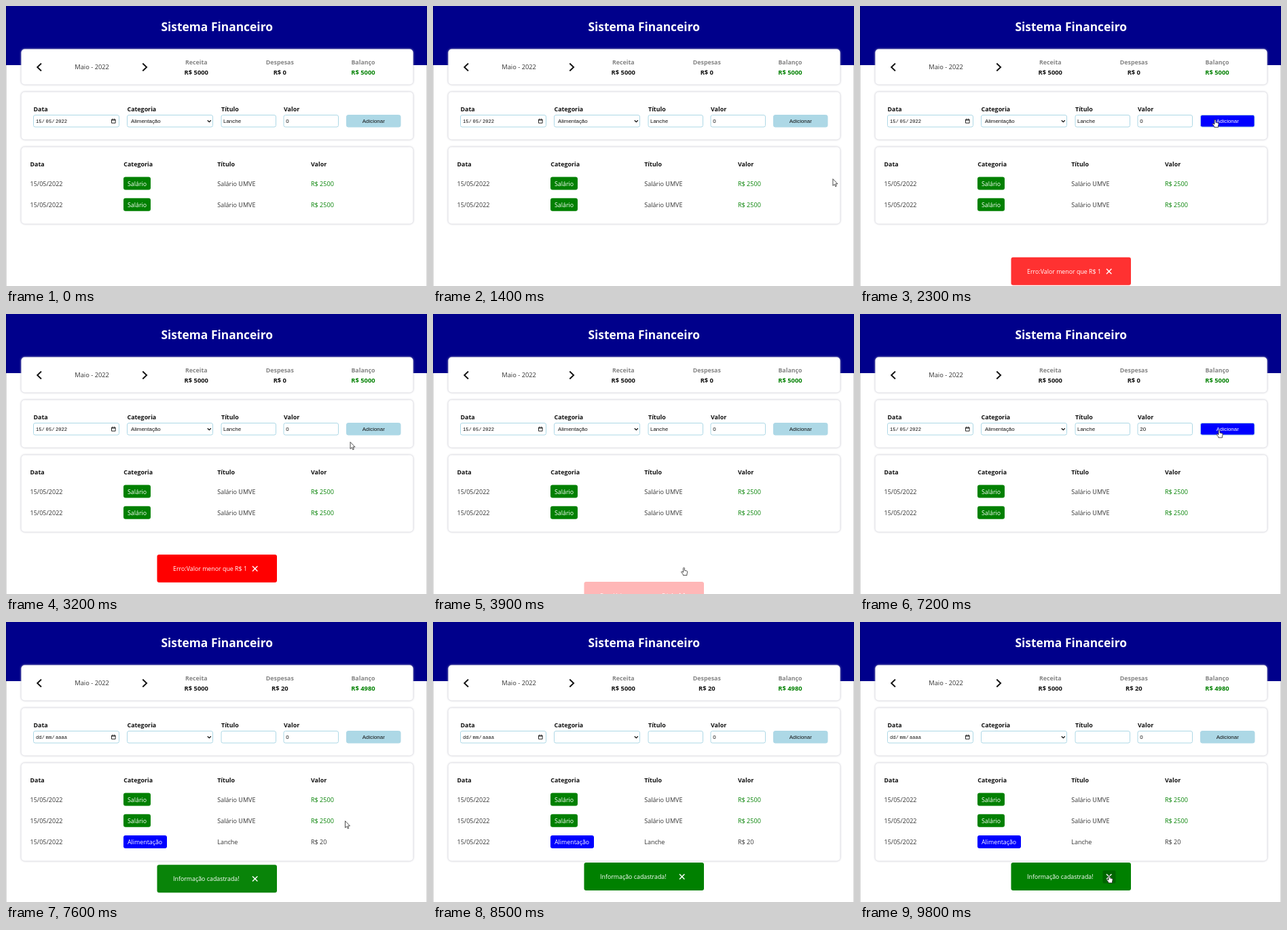
Animation of 620 by 412 pixels, one loop 9.9 s. Source, as an HTML page:

```html
<!DOCTYPE html>
<html lang="pt-BR">
<head>
<meta charset="utf-8">
<title>Sistema Financeiro</title>
<style>
  html, body { margin: 0; width: 100%; height: 100%; overflow: hidden; background: #fff; }
  svg { display: block; width: 620px; height: 412px; }
  text { font: 9.05px "Open Sans", "Noto Sans", sans-serif; fill: #333; white-space: pre; }
  .title { font-size: 17.4px; font-weight: 700; fill: #fff; }
  .label { font-size: 8.9px; font-weight: 700; fill: #111; }
  .head { font-size: 8.85px; font-weight: 700; fill: #858585; }
  .sum { font-size: 9.4px; font-weight: 700; fill: #111; }
  .mid { text-anchor: middle; }
  .green { fill: green; }
  .white { fill: #fff; }
  .tag, .note { font-size: 8.85px; fill: #fff; }
  .ctl { font: 7.95px "Liberation Sans", Arial, sans-serif; fill: #111; }
  .mono { font: 7.15px "Liberation Mono", "DejaVu Sans Mono", monospace; fill: #111; }
  .card { fill: #fff; filter: drop-shadow(0 0 1.4px #b4b4c0); }
  .field { fill: #fff; stroke: #add8e6; }
  .line { fill: none; stroke: #111; }
  .cursor { fill: #fff; stroke: #222; stroke-width: .8; stroke-linejoin: round; }
</style>
</head>
<body>
<svg viewBox="0 0 620 412">
  <rect width="620" height="412" fill="#fff"/>
  <rect width="620" height="87" fill="#00008b"/>
  <path d="M.5 0V412M619.5 0V412" stroke="#000" stroke-opacity=".15"/>
  <text class="title mid" x="310.7" y="37">Sistema Financeiro</text>

  <rect class="card" x="22.5" y="63.5" width="577" height="52" rx="5"/>
  <path class="line" stroke-width="1.9" d="M52 84.5 46.2 90 52 95.5M201.3 84.5 207.1 90 201.3 95.5"/>
  <text class="mid" x="126.6" y="93.3" style="font-size:9.3px">Maio - 2022</text>
  <g class="mid">
    <text class="head" x="280.3" y="86">Receita</text>
    <text class="head" x="403.3" y="86">Despesas</text>
    <text class="head" x="526" y="86">Balanço</text>
    <text class="sum" x="280.3" y="101.3">R$ 5000</text>
    <text class="sum" id="spent" x="403.3" y="101.3">R$ 0</text>
    <text class="sum green" id="balance" x="526" y="101.3">R$ 5000</text>
  </g>

  <rect class="card" x="22.5" y="126.5" width="577" height="70" rx="5"/>
  <text class="label" x="40.5" y="155">Data</text>
  <text class="label" x="178.5" y="155">Categoria</text>
  <text class="label" x="317" y="155">Título</text>
  <text class="label" x="409" y="155">Valor</text>
  <rect class="field" x="40.5" y="160.5" width="126" height="17.5" rx="2.5"/>
  <rect class="field" x="178.5" y="160.5" width="126" height="17.5" rx="2.5"/>
  <rect class="field" x="317" y="160.5" width="80.5" height="17.5" rx="2.5"/>
  <rect class="field" id="amountBox" x="409" y="160.5" width="80.5" height="17.5" rx="2.5"/>
  <text class="mono" y="171.8"><tspan id="day" x="44"></tspan><tspan id="month" x="58.6"></tspan><tspan id="year" x="73"></tspan></text>
  <path class="line" stroke-width=".9" d="M155.5 167h5.6v5.2h-5.6zM155.5 168h5.6M156.8 165.8v1.2M159.8 165.8v1.2"/>
  <text class="ctl" id="category" x="184" y="172"></text>
  <path class="line" stroke-width="1.3" d="M296.8 168.2l2.5 2.4 2.5-2.4"/>
  <text class="ctl" id="name" x="320" y="172"></text>
  <text class="ctl" id="amount" x="412.3" y="172"></text>
  <path class="line" id="caret" stroke-width=".9" d="M0 164.8v8.6"/>
  <g id="spinner">
    <rect x="476.5" y="163.8" width="9" height="11" fill="#eee"/>
    <path fill="#444" d="M478.6 168l2.4-2.6 2.4 2.6zM478.6 170.6l2.4 2.6 2.4-2.6z"/>
  </g>
  <rect id="button" x="501.5" y="160.5" width="79.5" height="17.5" rx="2.5" stroke="#add8e6"/>
  <text class="ctl mid" id="buttonText" x="541.3" y="172">Adicionar</text>

  <rect class="card" id="list" x="22.5" y="207.5" width="577" height="113" rx="5"/>
  <text class="label" x="35.5" y="236.3">Data</text>
  <text class="label" x="173.3" y="236.3">Categoria</text>
  <text class="label" x="311.2" y="236.3">Título</text>
  <text class="label" x="449" y="236.3">Valor</text>
  <g id="rows"></g>

  <g id="toast">
    <rect id="toastBox" x="222.5" y="354" width="176.5" height="41" rx="3"/>
    <rect id="closeBox" x="357.5" y="365.5" width="19" height="19" rx="2" fill="#000" fill-opacity=".2"/>
    <text class="note" id="note" x="246" y="378"></text>
    <path d="M363 371l7.4 7.4M370.4 371l-7.4 7.4" stroke="#fff" stroke-width="1.4"/>
  </g>

  <g id="cursor">
    <path class="cursor" id="hand" d="M-1 .8Q0-.7 1 .8V4.4L4.2 5Q5.3 5.3 5.2 6.5L4.5 9.6V11.4H-1.2V10.2L-3.6 7.2Q-4.2 6.2-3.2 5.8L-1 7.1Z"/>
    <path class="cursor" id="arrow" d="M0 0V10L2.3 7.9 3.8 11.3 5.3 10.6 3.9 7.3H7Z"/>
  </g>
</svg>
<script>
const LOOP = 9900, STEP = 100;
const SUBMIT = 7300;
const $ = id => document.getElementById(id);
const set = (id, attrs) => { for (const k in attrs) $(id).setAttribute(k, attrs[k]); };
const show = (id, on) => set(id, { visibility: on ? 'visible' : 'hidden' });
const write = (id, s) => { $(id).textContent = s; };
const within = (t, a, b) => t >= a && t < b;
const smooth = p => p * p * (3 - 2 * p);

const row = (y, tag, width, color, name, value, cls) => `<g>
  <text x="35.5" y="${y}">15/05/2022</text>
  <rect x="173" y="${y - 13}" width="${width}" height="19" rx="3" fill="${color}"/>
  <text class="tag" x="179" y="${y}">${tag}</text>
  <text x="311.2" y="${y}">${name}</text>
  <text class="${cls}" x="449" y="${y}">${value}</text></g>`;
const salary = y => row(y, 'Salário', 40, 'green', 'Salário UMVE', 'R$ 2500', 'green');
$('rows').innerHTML = salary(264.5) + salary(295.8) +
  row(327, 'Alimentação', 64, 'blue', 'Lanche', 'R$ 20', '');
$('rows').lastElementChild.id = 'newRow';

// Pointer runs: time, x, y
const runs = [
  [[1300, 612, 285], [1600, 523, 167], [3100, 523, 167], [3600, 369.5, 373], [4000, 369.5, 373], [4500, 430, 168], [4800, 430, 168]],
  [[6600, 440, 170], [7000, 529, 170.5], [7400, 529, 170.5], [7800, 470, 415]],
  [[9100, 420, 415], [9600, 367, 372.5], [LOOP, 367, 372.5]]
];

function pointer(t) {
  const run = runs.find(r => within(t, r[0][0], r[r.length - 1][0]));
  if (!run) return null;
  const i = run.findIndex(p => p[0] > t);
  const [t0, x0, y0] = run[i - 1], [t1, x1, y1] = run[i];
  const p = smooth((t - t0) / (t1 - t0));
  return { x: x0 + (x1 - x0) * p, y: y0 + (y1 - y0) * p };
}

// The CSS "ease" curve
function ease(p) {
  const bez = (a, b, u) => 3 * a * u * (1 - u) ** 2 + 3 * b * u * u * (1 - u) + u ** 3;
  let lo = 0, hi = 1;
  for (let i = 0; i < 20; i++) {
    const u = (lo + hi) / 2;
    if (bez(.25, .25, u) < p) lo = u; else hi = u;
  }
  return bez(.1, 1, lo);
}

function toastAt(t) {
  const enter = start => {
    const p = ease(Math.min(1, (t - start) / 400));
    return { drop: 80 * (1 - p), alpha: p };
  };
  if (t >= SUBMIT) return enter(SUBMIT);
  if (within(t, 2100, 3700)) return enter(2100);
  if (within(t, 3700, 4000)) {
    const p = (t - 3700) / 300;
    return { drop: 60 * p, alpha: Math.max(0, 1 - 1.08 * p) };
  }
  return { drop: 80, alpha: 0 };
}

function draw(t) {
  const done = t >= SUBMIT;
  const pos = pointer(t);
  const over = (x, y, w, h) => !!pos && within(pos.x, x, x + w) && within(pos.y, y, y + h);

  write('spent', done ? 'R$ 20' : 'R$ 0');
  write('balance', done ? 'R$ 4980' : 'R$ 5000');
  write('day', done ? 'dd/' : '15/');
  write('month', done ? 'mm/' : '05/');
  write('year', done ? 'aaaa' : '2022');
  write('category', done ? '' : 'Alimentação');
  write('name', done ? '' : 'Lanche');
  set('list', { height: done ? 144 : 113 });
  show('newRow', done);

  const focus = within(t, 4500, 7100);
  const amount = done || t < 4800 ? '0' : t < 5900 ? '' : t < 6000 ? '2' : '20';
  write('amount', amount);
  set('amountBox', { style: focus ? 'stroke:#111;stroke-width:1.6' : '' });
  show('spinner', focus);
  show('caret', focus && !within(t, 5400, 5900) && t < 6600);
  set('caret', { transform: `translate(${412.6 + amount.length * 4.42} 0)` });

  const hot = over(501, 160, 80, 19);
  set('button', { fill: hot ? 'blue' : '#add8e6' });
  set('buttonText', { style: hot ? 'fill:#fff' : '' });

  const { drop, alpha } = toastAt(t);
  const close = alpha > .99 && over(357, 365, 20, 20);
  set('toast', { transform: `translate(0 ${drop})`, opacity: alpha });
  set('toastBox', { fill: done ? 'green' : 'red' });
  write('note', done ? 'Informação cadastrada!' : 'Erro:Valor menor que R$ 1');
  set('closeBox', { opacity: close ? 1 : 0 });

  const hand = hot || close || within(t, 3700, 4000);
  show('hand', pos && hand);
  show('arrow', pos && !hand);
  if (pos) set('cursor', { transform: `translate(${pos.x} ${pos.y})` });
}

function tick(now) {
  draw(Math.floor(now % LOOP / STEP) * STEP);
  requestAnimationFrame(tick);
}
draw(0);
requestAnimationFrame(tick);
</script>
</body>
</html>
```
